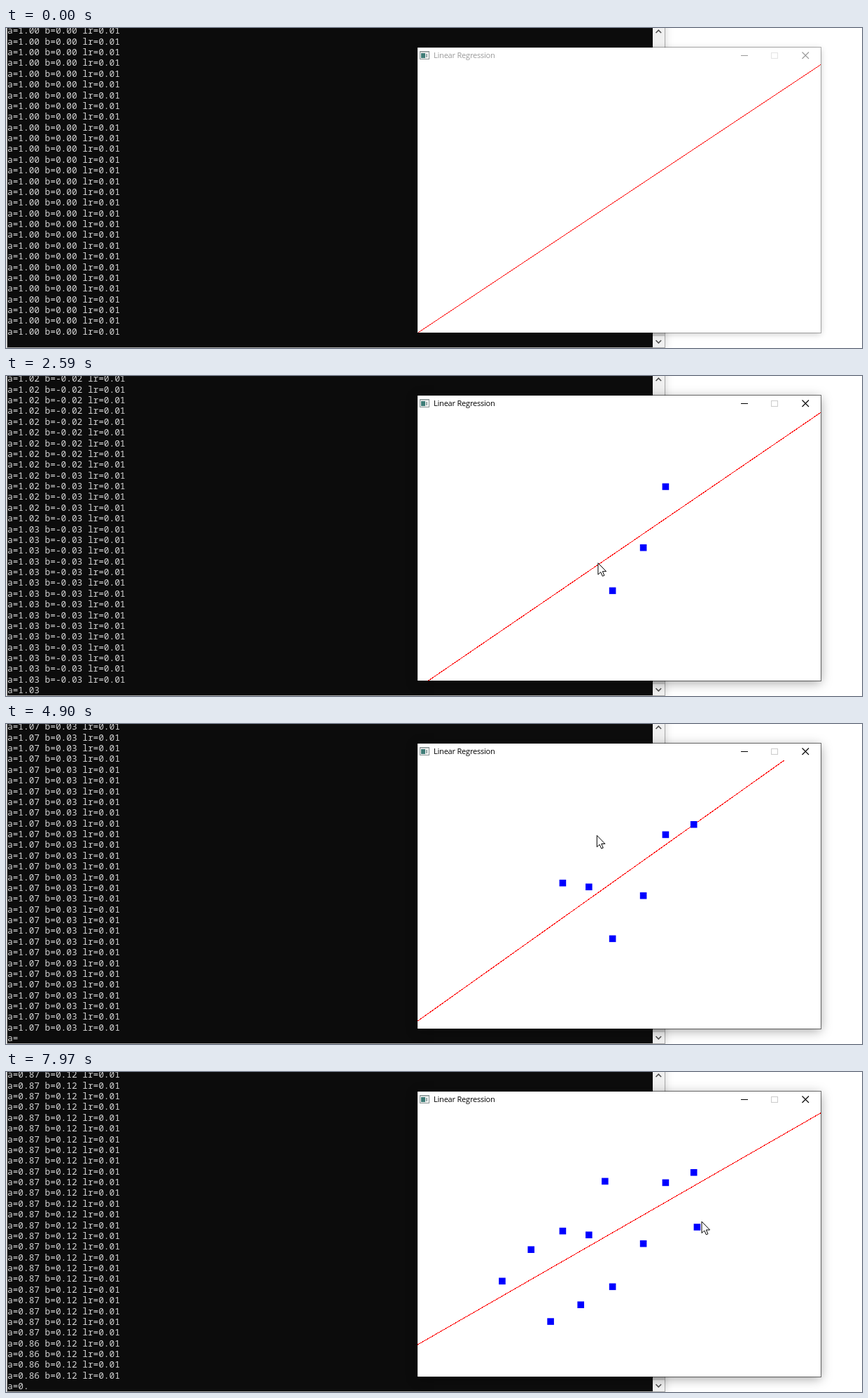
Recreate the animation shown at these times as an HTML page. Size 1223 px wide and 458 px high, loop 8 s.

```html
<!DOCTYPE html>
<html lang="en">
<head>
<meta charset="utf-8">
<title>Linear Regression</title>
<style>
  html, body { margin: 0; width: 100%; height: 100%; overflow: hidden; background: #fff; }
  #stage { position: relative; width: 1223px; height: 458px; overflow: hidden; }
  #console {
    position: absolute; left: 2px; top: -20px; width: 939px; height: 477px;
    background: #0c0c0c; box-shadow: 0 0 0 1px #a8a8a8, 0 2px 12px rgba(0, 0, 0, .2);
  }
  #log {
    position: absolute; left: 2px; top: -3.7px; margin: 0; color: #d4d4d4;
    font: 12.78px/15.37px "Noto Sans Mono", "DejaVu Sans Mono", monospace;
  }
  #bar { position: absolute; left: 924px; top: 0; width: 17px; height: 457px; background: #f0f0f0; }
  #thumb { position: absolute; left: 0; top: 300px; width: 17px; height: 141px; background: #cdcdcd; }
  #window {
    position: absolute; left: 588px; top: 28px; width: 576px; height: 408px; background: #fff;
    box-shadow: 0 0 0 1px rgba(0, 0, 0, .3), 0 2px 9px rgba(0, 0, 0, .22);
    color: #999; --faint: #e4e4e4;
  }
  #window.active {
    box-shadow: 0 0 0 1px rgba(0, 0, 0, .55), 0 3px 15px rgba(0, 0, 0, .36);
    color: #000; --faint: #ccc;
  }
  #title {
    position: absolute; left: 23px; top: 3px; white-space: pre; letter-spacing: -.2px;
    font: 11px/16px "Open Sans", "Noto Sans", sans-serif;
  }
  svg { position: absolute; left: 0; top: 0; }
  #window svg { top: -1px; }
</style>
</head>
<body>
<div id="stage">
  <div id="console"></div>
  <pre id="log"></pre>
  <div id="bar">
    <div id="thumb"></div>
    <svg width="17" height="457" fill="none" stroke="#505050" stroke-width="1.6">
      <path d="M4.5 7L8.3 3.2L12.1 7M4.5 447L8.3 450.8L12.1 447"/>
    </svg>
  </div>
  <div id="window">
    <div id="title">Linear Regression</div>
    <svg width="576" height="25" fill="none" stroke="currentColor">
      <rect x="3.5" y="6.5" width="13" height="11" fill="#f4f4f4" stroke="#8a9494"/>
      <path d="M4 7.5H16" stroke="#b5bcbc"/>
      <rect x="5" y="9" width="6" height="7" fill="#3f7d78" stroke="none"/>
      <path d="M13 10V15" stroke="#9aa" stroke-width="2"/>
      <path d="M462 12.5H472"/>
      <rect x="505.5" y="8.5" width="9" height="8" stroke="var(--faint)"/>
      <path d="M549.5 7.5L559 17M559 7.5L549.5 17" stroke-width="1.1"/>
    </svg>
  </div>
  <svg width="1223" height="458">
    <svg x="588" y="52" width="576" height="384">
      <line id="fit" x1="0" x2="576" stroke="#f00" shape-rendering="crispEdges"/>
    </svg>
    <g id="dots" fill="#00f"></g>
    <path id="cursor" d="M0 0V16.5L3.8 13L6.4 18.8L8.9 17.7L6.4 12H11.6Z" fill="#fff" stroke="#000"/>
  </svg>
</div>
<script>
const LOOP = 8000, STEP = 76.8, LAST = 104, ACTIVE_FROM = 4;
const PASSES = 36, RATE = 0.01, ROWS = 29; // training passes per step, one log row each
const LEFT = 588, TOP = 52, BASE = 436.5, W = 576, H = 384;

// Each click drops a dot: step, x, y
const clicks = [
  [17, 937.6, 153.6], [25, 905.8, 240.9], [28.7, 861.8, 302.5], [39, 828, 228.4],
  [48, 977.9, 139], [57, 790.6, 222.8], [66, 851, 151.6], [75, 816.4, 328.4],
  [86, 773.3, 352.3], [90, 745.4, 249.4], [92.2, 704.1, 294.5], [98.2, 982.6, 217.2]
];
const path = [[7, 1010, 118], ...clicks, [LAST, 994, 214]];

const $ = id => document.getElementById(id);

const dots = clicks.map(([, x, y]) => {
  const dot = document.createElementNS('http://www.w3.org/2000/svg', 'rect');
  const box = { x, y, width: 9.6, height: 9.6 };
  for (const name in box) dot.setAttribute(name, box[name]);
  return $('dots').appendChild(dot);
});

// Gradient descent over the dots present, one pass per entry
const fits = [[1, 0]];
for (let n = 1; n <= LAST * PASSES; n++) {
  let [a, b] = fits[n - 1];
  for (const [step, px, py] of clicks) {
    if (step * PASSES > n) break;
    const x = (px - LEFT) / W, y = (BASE - py) / H;
    const err = y - (a * x + b);
    a += err * x * RATE;
    b += err * RATE;
  }
  fits.push([a, b]);
}

// Rest a third of the way between clicks, then move and slow down
function pointer(k) {
  const i = Math.max(1, path.findIndex(p => p[0] >= k));
  const [k0, x0, y0] = path[i - 1], [k1, x1, y1] = path[i];
  const u = Math.max(0, (k - k0) / (k1 - k0) * 1.5 - 0.5);
  const e = u * (2 - u);
  return [x0 + (x1 - x0) * e, y0 + (y1 - y0) * e];
}

function rowText(n) {
  const [a, b] = fits[Math.max(0, n)];
  return `a=${a.toFixed(2)} b=${b.toFixed(2)} lr=0.01`;
}

// Full rows, then one still being printed
function logText(k) {
  const n = k * PASSES;
  const rows = Array.from({ length: ROWS }, (_, i) => rowText(n - ROWS + i));
  rows.push(rowText(n).slice(0, Math.floor(k * 0.127 % 1 * 22)));
  return rows.join('\n');
}

const show = (el, on) => el.setAttribute('visibility', on ? 'visible' : 'hidden');

function draw(k) {
  const [a, b] = fits[k * PASSES];
  $('log').textContent = logText(k);
  $('window').classList.toggle('active', k >= ACTIVE_FROM);
  $('fit').setAttribute('y1', BASE - TOP - H * b);
  $('fit').setAttribute('y2', BASE - TOP - H * (a + b));
  dots.forEach((dot, i) => show(dot, k >= clicks[i][0]));
  $('cursor').setAttribute('transform', `translate(${pointer(k)})`);
  show($('cursor'), k >= path[0][0]);
}

let shown = -1;
const t0 = performance.now();
function tick() {
  const t = (performance.now() - t0) % LOOP;
  const k = Math.min(LAST, Math.floor((t + 25) / STEP));
  if (k !== shown) draw(shown = k);
  requestAnimationFrame(tick);
}
tick();
</script>
</body>
</html>
```
